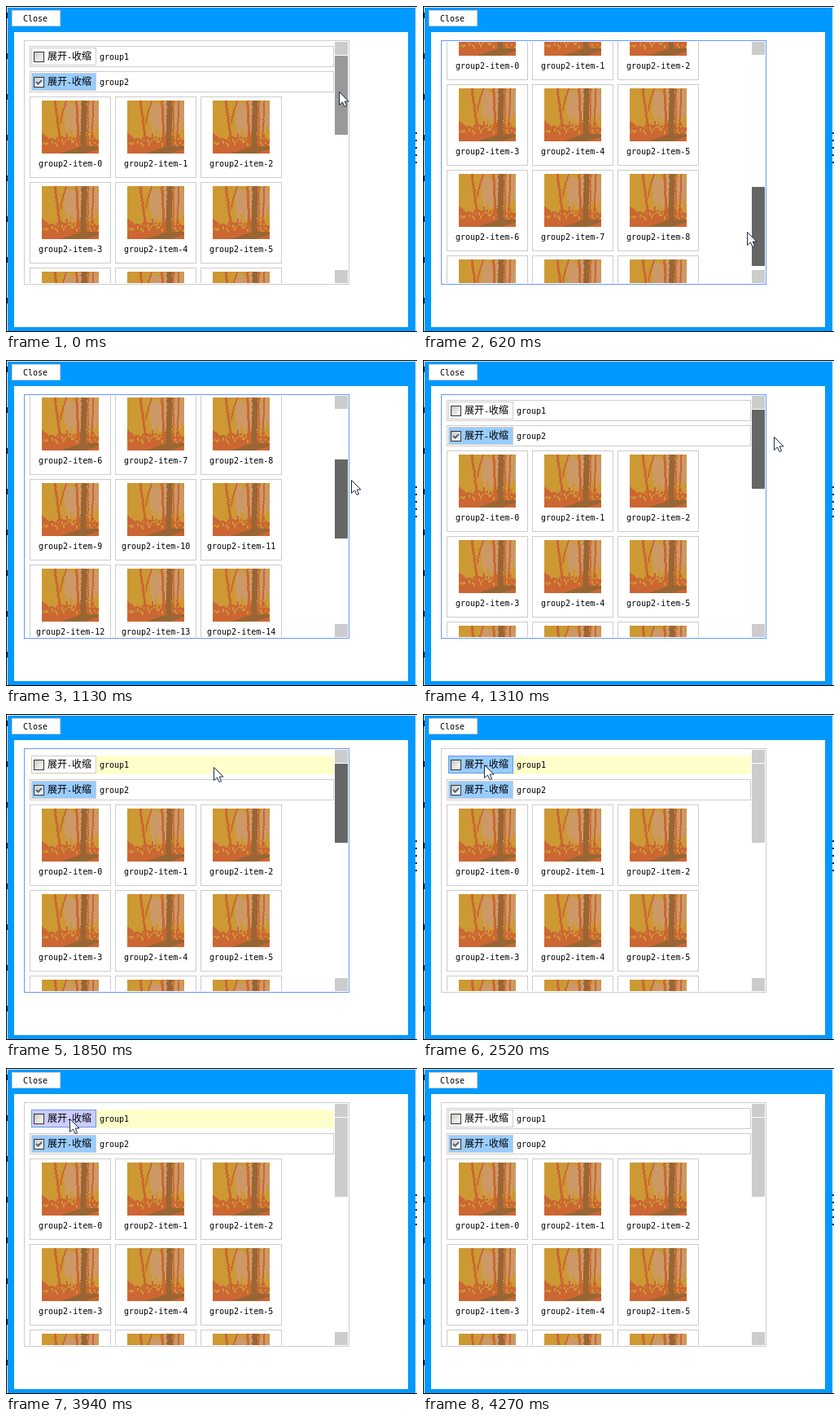
Animation of 505x400 px, one loop 4800 ms. Source, as an HTML page with a canvas:

```html
<!DOCTYPE html>
<html lang="zh">
<head>
<meta charset="utf-8">
<style>
html, body { margin: 0; width: 100%; height: 100%; overflow: hidden; background: #fff; }
canvas { display: block; }
</style>
</head>
<body>
<canvas id="stage" width="505" height="400"></canvas>
<script>
const g = document.getElementById('stage').getContext('2d');
const LOOP = 4800, MAX_SCROLL = 505.6, SCROLL_LAG = 60;
const MONO = '10px "DejaVu Sans Mono", "Liberation Mono", monospace';
const CJK = '12px "Noto Sans CJK SC", "Noto Sans CJK", sans-serif';
const GOLD = '#cc9933', TAN = '#cc9966', RUST = '#cc6633', BROWN = '#996633';

// Pointer stops: time, x, y
const STOPS = [
  [500, 409, 105], [620, 398, 277], [940, 398, 286], [1130, 424, 147], [1310, 431, 94],
  [1610, 435, 68], [2090, 75, 62], [3380, 75, 62], [3410, 78, 62], [3920, 78, 62], [4240, 95, 34]
];

const clamp = v => Math.min(1, Math.max(0, v));

function pointer(t) {
  const i = STOPS.findIndex(s => s[0] > t);
  const b = STOPS[i < 0 ? STOPS.length - 1 : i];
  const a = STOPS[i < 0 ? STOPS.length - 1 : Math.max(0, i - 1)];
  const f = clamp((t - a[0]) / (b[0] - a[0] || 1));
  return [1, 2].map(k => Math.round(a[k] + (b[k] - a[k]) * f));
}

// Share of the scroll range: quick drag down, hold, slower drag back
const drag = t => Math.min(clamp((t - 540.7) / 81.25), clamp((1250 - t) / 325));

function rect(x, y, w, h, color) {
  g.fillStyle = color;
  g.fillRect(x, y, w, h);
}

function box(x, y, w, h, line, fill) {
  if (fill) rect(x, y, w, h, fill);
  g.strokeStyle = line;
  g.lineWidth = 1;
  g.strokeRect(x + 0.5, y + 0.5, w - 1, h - 1);
}

function text(s, x, y, font = MONO) {
  g.fillStyle = '#000';
  g.font = font;
  g.fillText(s, x, y);
}

// Autumn wood in flat tones with ragged edges, drawn once
function paintWood() {
  const wood = document.createElement('canvas');
  wood.width = 70;
  wood.height = 65;
  const c = wood.getContext('2d');
  let seed = 7;
  const random = () => (seed = seed * 16807 % 2147483647) / 2147483647;
  const fill = (color, x, y, w, h) => {
    c.fillStyle = color;
    c.fillRect(Math.round(x), Math.round(y), w, Math.round(h));
  };
  const trunk = (color, top, foot, w, h) => {
    for (let y = 0; y < h; y++) fill(color, top + (foot - top) * y / h + random(), y, w, 1);
  };
  for (let x = 0; x < 70; x += 2) {
    fill(GOLD, x, 0, 2, 65);
    if (x > 27) fill(TAN, x, random() * 8, 2, 28 + random() * 14);
    const ground = 40 + random() * 9;
    fill(RUST, x, ground, 2, 65 - ground);
    fill(GOLD, x, 44 + random() * 10, 2, random() * 4);
  }
  trunk(RUST, 14, 21, 3, 52);
  trunk(RUST, 28, 21, 2, 28);
  trunk(RUST, 41, 43, 3, 50);
  trunk(BROWN, 48, 47, 7, 60);
  trunk(RUST, 55, 55, 2, 50);
  trunk(RUST, 62, 60, 2, 46);
  for (let y = 56; y < 65; y++) fill(BROWN, 48 - (y - 56) * 3, y, 30, 1);
  return wood;
}
const wood = paintWood();

function groupRow(y, name, checked, hover, fill, line) {
  if (hover) rect(30, y + 2, 373, 23, '#ffffcc');
  else box(29, y, 374, 26, '#ccc', '#fff');
  box(31, y + 2, 80, 22, line, fill);
  const shade = g.createLinearGradient(35, y + 8, 46, y + 19);
  shade.addColorStop(0, '#c8c8c0');
  shade.addColorStop(1, '#fff');
  box(34, y + 7, 13, 13, '#333', shade);
  if (checked) {
    g.strokeStyle = '#4d6185';
    g.lineWidth = 2;
    g.beginPath();
    g.moveTo(37, y + 13);
    g.lineTo(39.5, y + 15.5);
    g.lineTo(44, y + 11);
    g.stroke();
  }
  text('展开', 51, y + 17, CJK);
  text('-', 75, y + 17);
  text('收缩', 81, y + 17, CJK);
  text(name, 115, y + 17);
}

function item(n, top) {
  const x = 29 + n % 3 * 105;
  const y = top + Math.floor(n / 3) * 105;
  const label = 'group2-item-' + n;
  box(x, y, 100, 100, '#ccc', '#fff');
  g.drawImage(wood, x + 15, y + 5);
  text(label, x + 50 - label.length * 3, y + 86);
}

// Window frame with slivers of the page behind it
function backdrop() {
  rect(0, 0, 505, 400, '#000');
  rect(1, 1, 504, 398, '#e8f0f8');
  for (let y = 8; y < 400; y += 50) rect(1, y, 1, 7, '#223');
  for (let y = 155; y < 195; y += 9) rect(503, y, 2, 2, '#223');
  rect(2, 2, 501, 397, '#0099ff');
  rect(10, 32, 484, 362, '#fff');
  box(7, 5, 60, 20, '#ccc', '#fff');
  text('Close', 21, 19);
}

function cursor(x, y) {
  g.save();
  g.translate(x, y);
  g.fillStyle = '#fff';
  g.strokeStyle = '#1c2a44';
  g.lineWidth = 1;
  const arrow = new Path2D('M.5 .5V16.5L4.5 13L7 18.5L9.5 17.5L7.2 12H12Z');
  g.fill(arrow);
  g.stroke(arrow);
  g.restore();
}

function draw(t) {
  const tick = Math.floor((t - 20) / 30) * 30 + 20;
  const [px, py] = pointer(tick);
  const thumb = 61 + Math.round(165 * drag(tick));
  const scroll = Math.round(MAX_SCROLL * drag(tick - SCROLL_LAG));
  const shown = t < 4270;
  const dragging = t >= 100 && t < 2460;
  const overRow = shown && px >= 29 && px < 403 && py >= 49 && py < 75;
  const overButton = overRow && px >= 31 && px < 111;
  const pressed = t >= 2460 && t < 2730;
  const buttonFill = !overButton ? '#fff' : pressed ? '#99ccff' : '#ccccff';

  backdrop();
  g.save();
  g.beginPath();
  g.rect(23, 44, 398, 296);
  g.clip();
  groupRow(49 - scroll, 'group1', false, overRow, buttonFill, overButton ? '#6699ff' : '#ccc');
  groupRow(80 - scroll, 'group2', true, false, '#99ccff', '#ccc');
  for (let n = 0; n < 21; n++) item(n, 111 - scroll);
  g.restore();

  rect(404, 44, 16, 16, '#ccc');
  rect(404, 324, 16, 16, '#ccc');
  rect(404, thumb, 16, 97, t < 100 ? '#999' : dragging ? '#666' : '#ccc');
  box(22, 42, 400, 300, dragging ? '#6699ff' : '#ccc');
  if (shown) cursor(px, py);
}

function frame(now) {
  draw(now % LOOP);
  requestAnimationFrame(frame);
}
draw(0);
requestAnimationFrame(frame);
</script>
</body>
</html>
```
